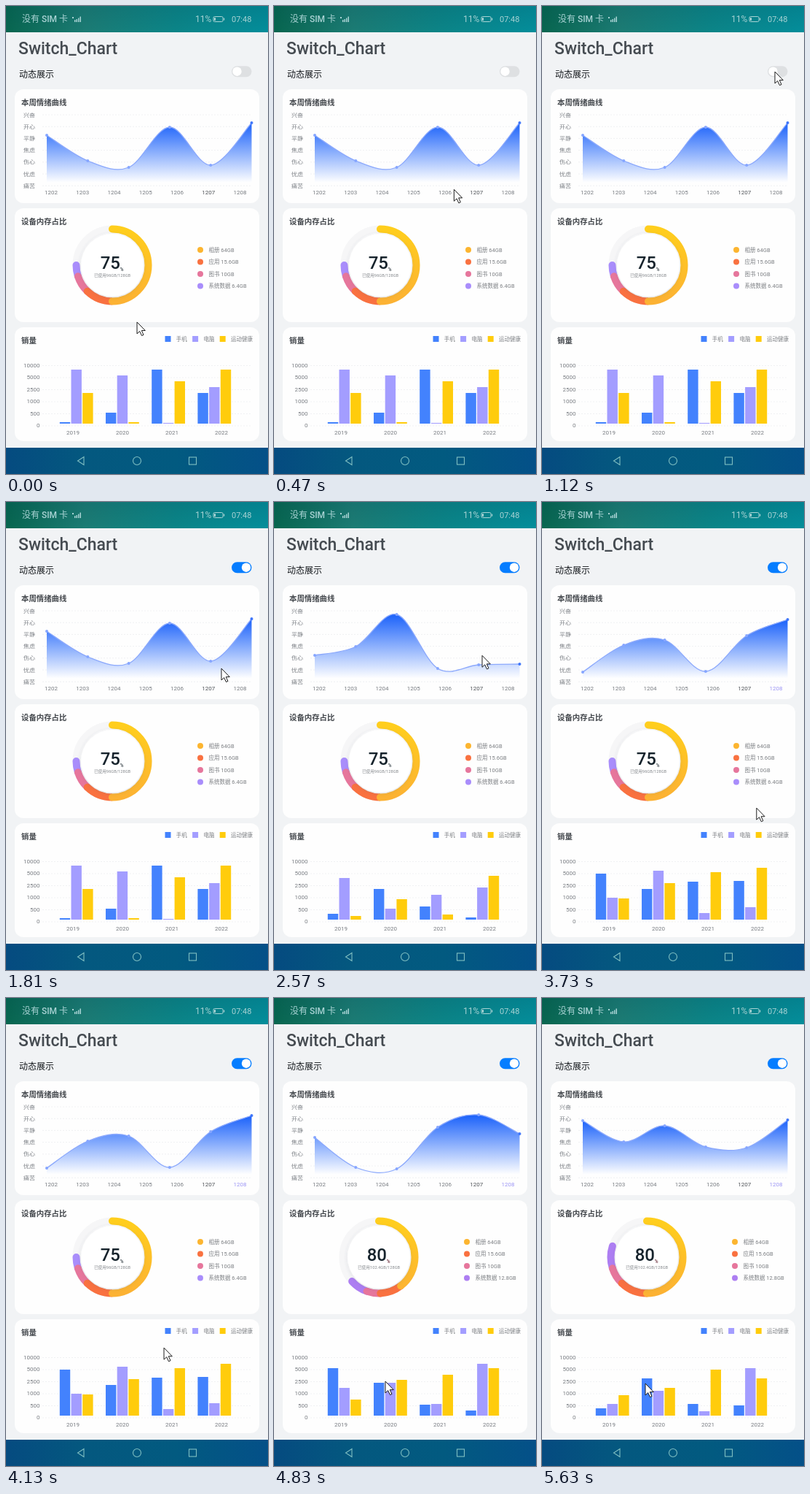
Recreate the animation shown at these times as an HTML page. Size 360 px wide and 641 px high, loop 5.94 s.

```html
<!DOCTYPE html>
<html lang="zh">
<head>
<meta charset="utf-8">
<title>Switch_Chart</title>
<style>
html, body { margin: 0; width: 100%; height: 100%; overflow: hidden; background: #f1f3f5; }
svg { display: block; width: 360px; height: 641px; font-family: Roboto, "Noto Sans CJK SC", "Noto Sans CJK", sans-serif; }
.heading { font-size: 10.4px; font-weight: 700; fill: #43474c; }
.axis { font-size: 8px; fill: #777b80; }
.legend { font-size: 7.5px; fill: #7b7e82; }
.status { fill: #a9d3d4; font-weight: 500; }
</style>
</head>
<body>
<svg viewBox="0 0 360 641">
  <defs>
    <linearGradient id="topBar">
      <stop offset="0" stop-color="#07664f"/><stop offset=".3" stop-color="#1c7c74"/>
      <stop offset=".65" stop-color="#0b8588"/><stop offset="1" stop-color="#048e9b"/>
    </linearGradient>
    <linearGradient id="shade" x2="0" y2="1">
      <stop stop-color="#003c50" stop-opacity=".15"/><stop offset="1" stop-color="#003c50" stop-opacity="0"/>
    </linearGradient>
    <linearGradient id="navBar">
      <stop offset="0" stop-color="#054b80"/><stop offset=".3" stop-color="#04587f"/>
      <stop offset=".65" stop-color="#025a80"/><stop offset="1" stop-color="#045088"/>
    </linearGradient>
    <linearGradient id="area" x2="0" y2="1">
      <stop stop-color="#1a61fa"/><stop offset="1" stop-color="#fff"/>
    </linearGradient>
    <linearGradient id="gold">
      <stop stop-color="#fcb233"/><stop offset="1" stop-color="#ffce1d"/>
    </linearGradient>
    <filter id="soft" x="-20%" y="-20%" width="140%" height="140%">
      <feDropShadow dx="0" dy="1" stdDeviation="2.5" flood-color="#4a5568" flood-opacity=".22"/>
    </filter>
  </defs>

  <rect width="360" height="641" fill="#f1f3f5"/>
  <rect width="360" height="36" fill="url(#topBar)"/>
  <rect width="360" height="36" fill="url(#shade)"/>
  <rect y="605" width="360" height="36" fill="url(#navBar)"/>
  <g class="status">
    <text x="22" y="22" font-size="12">没有 SIM 卡</text>
    <text x="260" y="22" font-size="12" font-weight="400">11%</text>
    <text x="310" y="21.5" font-size="11" font-weight="400">07:48</text>
    <path d="M91 15h2v2h-2zM94 19h1.5v3H94zM96.5 18H98v4h-1.500zM99 16.500h1.500V22H99zM101.500 14.500h1.500V22h-1.500z"/>
    <rect x="285" y="14.500" width="13" height="7" rx="1.500" fill="none" stroke="#a9d3d4"/>
    <path d="M286 16h2v4h-2zM299 16.500h1.200v3H299z"/>
  </g>
  <g fill="none" stroke="#80bfc2" stroke-width="1.100">
    <path d="M107 617.500V628.500L98.500 623Z"/>
    <circle cx="180" cy="623" r="5.500"/>
    <rect x="251.500" y="618" width="10" height="10"/>
  </g>

  <text x="17" y="66" font-size="23" font-weight="500" fill="#454b51">Switch_Chart</text>
  <text x="18" y="97.500" font-size="12" font-weight="500" fill="#15191d">动态展示</text>
  <rect id="track" x="310" y="82.200" width="27.500" height="15" rx="7.500"/>
  <circle id="knob" cy="89.700" r="6.200" fill="#fff"/>

  <g id="cards"></g>
  <g id="lineChart"></g>
  <g id="donut"></g>
  <g id="barChart"></g>
  <path id="cursor" d="M0 0V16L3.700 12.600L6.500 18.600L9 17.500L6.300 11.600H11.300Z" fill="#fff" stroke="#1c1c1c"/>
</svg>

<script>
const LOOP = 5940;
const DONUT_START = 4570;
const DONUT_TIME = 480;

const datasets = [
  { at: 0, line: [177, 212, 221, 166, 218, 160],
    bars: [[570, 557, 498, 530], [498, 506, 571, 522], [530, 570, 514, 498]] },
  { at: 2570, line: [210, 198, 154, 228, 223, 222],
    bars: [[564, 530, 554, 569], [515, 557, 538, 528], [567, 544, 565, 512]] },
  { at: 3550, line: [233, 196, 189, 232, 183, 161],
    bars: [[509, 530, 520, 519], [542, 505, 563, 555], [543, 522, 507, 501]] },
  { at: 4570, line: [191, 232, 234, 177, 160, 186],
    bars: [[507, 527, 557, 565], [534, 527, 556, 501], [550, 523, 516, 507]] },
  { at: 5560, line: [168, 197, 175, 204, 205, 167],
    bars: [[562, 521, 556, 558], [556, 538, 566, 507], [544, 534, 509, 521]] },
];

// time, x, y of the pointer tip
const pointerPath = [
  [0, 180, 433], [70, 182, 428], [610, 270, 190], [730, 274, 182], [1120, 320, 90],
  [1630, 320, 90], [1810, 296, 228], [2270, 286, 210], [2570, 286, 210],
  [3160, 293, 360], [3230, 294, 375], [3550, 295, 419], [3730, 295, 419],
  [4270, 190, 500], [4570, 172, 515], [4830, 153, 525], [5210, 143, 528], [5630, 142, 528],
];

const barColors = ["#4382fd", "#a39dff", "#ffcc0c"];
const memory = [["相册", 64, "#fcb530"], ["应用", 15.6, "#f97140"], ["图书", 10, "#e6769c"], ["系统数据", 6.4, "#a98dfb"]];

const el = id => document.getElementById(id);
const clamp = v => Math.max(0, Math.min(1, v));
const mix = (a, b, p) => a + (b - a) * p;
const text = (x, y, cls, str, extra = "") => `<text x="${x}" y="${y}" class="${cls}" ${extra}>${str}</text>`;
const axisText = (x, y, str, anchor, fill = "") =>
  text(0, 0, "axis", str, `transform="translate(${x} ${y}) scale(1 .82)" text-anchor="${anchor}" ${fill && `style="fill:${fill}"`}`);
const gridLine = y => `<path d="M50 ${y}H338" stroke="#eceef0" stroke-width=".8" stroke-dasharray="2 2"/>`;

function drawCards() {
  const titles = ["本周情绪曲线", "设备内存占比", "销量"];
  let out = titles.map((title, i) => {
    const y = 114 + 163 * i;
    return `<rect x="12" y="${y}" width="336" height="156" rx="12" fill="#fefefe"/>` + text(21, y + 21.5, "heading", title);
  }).join("");
  ["兴奋", "开心", "平静", "焦虑", "伤心", "忧虑", "痛苦"].forEach((mood, i) => {
    const y = 149 + 16.2 * i;
    out += gridLine(y) + axisText(40, y + 2.5, mood, "end");
  });
  [10000, 5000, 2500, 1000, 500, 0].forEach((value, i) => {
    const y = 492.5 + 16.5 * i;
    out += gridLine(y) + axisText(46.5, y + 2.4, value, "end");
  });
  for (let i = 0; i < 4; i++) out += axisText(92 + 68 * i, 587, 2019 + i, "middle");
  ["手机", "电脑", "运动健康"].forEach((name, i) => {
    const x = 218.5 + 37.6 * i;
    out += `<rect x="${x}" y="452" width="8" height="8" fill="${barColors[i]}"/>` + text(x + 15.3, 458.7, "legend", name);
  });
  el("cards").innerHTML = out;
}

function drawLine(ys, index) {
  const pts = ys.map((y, i) => [56 + 56.3 * i, y]);
  const at = i => pts[Math.max(0, Math.min(pts.length - 1, i))];
  let curve = `M${pts[0]}`;
  for (let i = 0; i < pts.length - 1; i++) {
    const [p0, p1, p2, p3] = [at(i - 1), at(i), at(i + 1), at(i + 2)];
    const c1 = p1.map((v, k) => v + (p2[k] - p0[k]) / 6);
    const c2 = p2.map((v, k) => v - (p3[k] - p1[k]) / 6);
    curve += `C${c1} ${c2} ${p2}`;
  }
  let out = `<path d="${curve}V242H56Z" fill="url(#area)"/><path d="${curve}" fill="none" stroke="#8ca9fc" stroke-width="1.3"/>`;
  pts.forEach(([x, y], i) => {
    out += `<circle cx="${x}" cy="${y}" r="2" fill="${i === 5 ? "#3f76fa" : "#86a6ff"}"/>`;
  });
  for (let i = 0; i < 7; i++) {
    const fill = i === 5 ? "#4c5055" : i === 6 && index > 1 ? "#9c96f5" : "";
    out += axisText(62 + 43.25 * i, 257.7, 1202 + i, "middle", fill);
  }
  el("lineChart").innerHTML = out;
}

function drawBars(series) {
  el("barChart").innerHTML = series.map((tops, s) => tops.map((top, g) =>
    `<rect x="${73.8 + 63.2 * g + 15.7 * s}" y="${top}" width="14.4" height="${572 - top}" fill="${barColors[s]}"/>`
  ).join("")).join("");
}

function drawDonut(grown, progress) {
  const cx = grown ? 144 : 146;
  const ring = `cx="${cx}" cy="355" r="49.5" fill="none" stroke-width="10"`;
  let start = 0, arcs = "", legend = "";
  memory.forEach(([name, size, color], i) => {
    const last = i === 3;
    const gb = last && grown ? 12.8 : size;
    const tint = last && grown ? "#ad7ef2" : color;
    const sweep = gb / 128 * 360 * progress;
    const y = 334 + 16.5 * i;
    arcs = `<circle ${ring} pathLength="360" stroke="${i ? tint : "url(#gold)"}" stroke-linecap="round"
      stroke-dasharray="${sweep} 720" stroke-dashoffset="${-start}" transform="rotate(-90 ${cx} 355)"/>` + arcs;
    start += sweep;
    legend += `<circle cx="${cx + 121}" cy="${y}" r="4" fill="${tint}"/>` + text(cx + 132.5, y + 2.7, "legend", `${name} ${gb}GB`);
  });
  el("donut").innerHTML = `<circle ${ring} stroke="#f6f6f7"/>${arcs}
    <circle cx="${cx}" cy="355" r="43" fill="#fff" filter="url(#soft)"/>
    <text x="${cx - 2.7}" y="360" font-size="24" font-weight="500" text-anchor="middle" fill="#16232c">${grown ? 80 : 75}</text>
    <text x="${cx + 10.7}" y="363" font-size="6.5" font-weight="500" fill="${grown ? "#6b2f3c" : "#333d44"}">%</text>
    <text x="${cx}" y="371" font-size="5.7" text-anchor="middle" fill="#85898d">已使用${grown ? 102.4 : 96}GB/128GB</text>
    ${legend}`;
}

function movePointer(t) {
  const next = pointerPath.findIndex(p => p[0] > t);
  const [t1, x1, y1] = pointerPath.at(next < 0 ? -1 : next);
  const [t0, x0, y0] = pointerPath.at(next < 0 ? -1 : next - 1);
  const p = t1 > t0 ? (t - t0) / (t1 - t0) : 0;
  el("cursor").setAttribute("transform", `translate(${mix(x0, x1, p)} ${mix(y0, y1, p)})`);
}

let shownData = -1, shownDonut = "";

function render(t) {
  const on = clamp((t - 1370) / 200);
  el("track").setAttribute("fill", `rgb(${mix(222, 6, on)},${mix(224, 125, on)},${mix(226, 255, on)})`);
  el("knob").setAttribute("cx", mix(317.5, 330, on));

  const index = datasets.findLastIndex(d => d.at <= t);
  if (index !== shownData) {
    shownData = index;
    drawLine(datasets[index].line, index);
    drawBars(datasets[index].bars);
  }

  const grown = t >= DONUT_START;
  const progress = grown ? 1 - (1 - clamp((t - DONUT_START) / DONUT_TIME)) ** 2 : 1;
  const donutKey = `${grown} ${progress}`;
  if (donutKey !== shownDonut) {
    shownDonut = donutKey;
    drawDonut(grown, progress);
  }
  movePointer(t);
}

drawCards();
const began = performance.now();
function tick() {
  render((performance.now() - began) % LOOP);
  requestAnimationFrame(tick);
}
tick();
</script>
</body>
</html>
```
